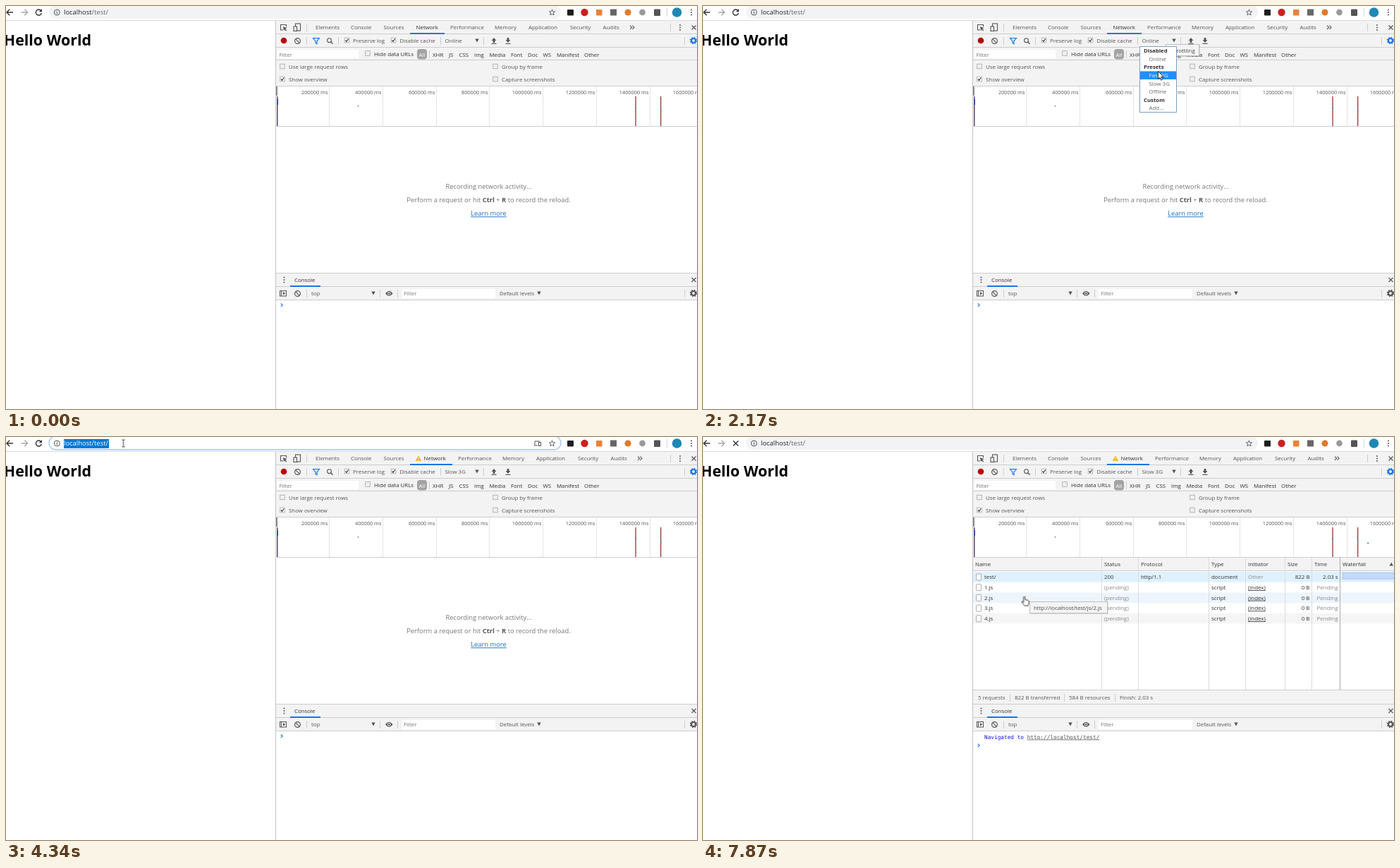
These frames come from a looping animation (980 by 571 pixels, 8000 ms). An HTML page:

```html
<!DOCTYPE html>
<html lang="en">
<head>
<meta charset="utf-8">
<title>Network throttling</title>
<style>
html, body { margin: 0; width: 100%; height: 100%; overflow: hidden; background: #fff; }
svg { display: block; font: 7.9px "Open Sans", "Noto Sans", sans-serif; }
text { white-space: pre; }
</style>
</head>
<body>
<svg id="stage" width="980" height="571" viewBox="0 0 980 571"></svg>
<script>
const LOOP = 8000;
const GREY = '#555', DARK = '#303030', LINE = '#cdcdcd', BAR = '#f3f3f3', BLUE = '#1a73e8';

// Drawing helpers; text is placed by the middle of its capitals
const text = (x, y, s, fill = GREY, attrs = '') =>
  `<text x="${x}" y="${y + 2.8}" fill="${fill}" ${attrs}>${s}</text>`;
const rect = (x, y, w, h, fill, attrs = '') =>
  `<rect x="${x}" y="${y}" width="${w}" height="${h}" fill="${fill}" ${attrs}/>`;
const circle = (x, y, r, fill, attrs = '') =>
  `<circle cx="${x}" cy="${y}" r="${r}" fill="${fill}" ${attrs}/>`;
const line = (d, stroke = GREY, w = 1, attrs = '') =>
  `<path d="${d}" fill="none" stroke="${stroke}" stroke-width="${w}" ${attrs}/>`;
const shape = (d, fill, attrs = '') => `<path d="${d}" fill="${fill}" ${attrs}/>`;
const hline = (y, x = 383, w = 597, c = LINE) => rect(x, y, w, 1, c);
const vline = (x, y, h, c = LINE) => rect(x, y, 1, h, c);
const labels = (y, fill, items) => items.map(([x, s]) => text(x, y, s, fill)).join('');
const END = 'text-anchor="end"', MID = 'text-anchor="middle"', BOLD = 'font-weight="700"';

// Groups shown only during the given [from, to] spans, kept in document order.
// A group that holds other timed groups passes a function, so that it is listed first.
const spans = [];
const during = (from, to, content, ...more) => {
  spans.push([[from, to], ...more]);
  return `<g class="timed">${typeof content === 'function' ? content() : content}</g>`;
};

// Icons
const dots = (x, y) => [-3.4, 0, 3.4].map(d => circle(x, y + d, 1, GREY)).join('');
const cross = (x, y, r = 3, c = GREY, w = 1.2) =>
  line(`M${x - r} ${y - r}l${2 * r} ${2 * r}m0 ${-2 * r}l${-2 * r} ${2 * r}`, c, w);
const gear = (x, y, c) => circle(x, y, 3, 'none', `stroke="${c}" stroke-width="2.2"`) +
  circle(x, y, 4.5, 'none', `stroke="${c}" stroke-width="1.5" stroke-dasharray="1.8 1.734"`);
const clear = (x, y) => circle(x, y, 3.9, 'none', `stroke="${GREY}" stroke-width="1.2"`) +
  line(`M${x - 2.7} ${y - 2.7}l5.4 5.4`, GREY, 1.2);
const down = (x, y) => shape(`M${x - 2.7} ${y - 2.4}h5.4l-2.7 4.8z`, GREY);
const check = (x, y, on) =>
  rect(x - 3.3, y - 3.3, 6.6, 6.6, on ? '#fff' : '#f0f0f0', 'stroke="#a5a5a5" stroke-width=".8"') +
  (on ? line(`M${x - 2} ${y}l1.5 1.8l2.7 -3.8`, '#333', 1.2) : '');
const load = (x, y, dir) => line(`M${x - 3.6} ${y + 4.4}h7.2`, GREY, 1.1) +
  shape(`M${x} ${y - 4 * dir - (dir < 0 ? 1 : 0)}l3.4 ${3.9 * dir}h-2v${3 * dir}h-2.8v${-3 * dir}h-2z`, GREY);
const arrowIcon = (x, dir, c) =>
  line(`M${x - 4.5 * dir} 9h${9 * dir}m${-4.2 * dir} -4.2l${4.2 * dir} 4.2l${-4.2 * dir} 4.2`, c, 1.4);
const page = (x, y) => rect(x, y, 7, 9, '#fff', 'stroke="#999" stroke-width=".8" rx=".8"');
const tooltip = (x, y, w, s) =>
  rect(x + 1, y + 1, w, 17, '#000', 'opacity=".12"') +
  rect(x + .5, y + .5, w - 1, 16, '#f4f4f4', 'stroke="#c0c0c0"') + text(x + 6, y + 8.8, s, '#4a4a4a');

function browserBar() {
  const url = (a, b) => text(82, 9.3, `${a}<tspan fill="${b}">/test/</tspan>`, '#222', 'font-size="9.45"');
  const star = Array.from({ length: 10 }, (_, i) => {
    const a = i * Math.PI / 5 - Math.PI / 2, r = i % 2 ? 1.9 : 4.4;
    return (774.5 + r * Math.cos(a)).toFixed(2) + ' ' + (9.3 + r * Math.sin(a)).toFixed(2);
  }).join('L');
  const pill = (fill, attrs = '') => rect(61, -1, 726, 19, fill, `rx="9.5" ${attrs}`);
  return rect(0, 0, 980, 20, '#fff') + hline(20, 0, 980, '#d9d9d9') +
    during(3370, 3520, circle(46, 9, 9.8, '#e8e8e8')) +
    arrowIcon(5.5, -1, '#333') + arrowIcon(26, 1, '#a8a8a8') +
    during(0, 5370, line('M49.2 6.2A4 4 0 1 0 50.3 9.8', '#333', 1.4) + shape('M51 4v4.3h-4.3z', '#333')) +
    during(5370, LOOP, cross(46.5, 9, 3.6, '#333', 1.4)) +
    pill('#f1f3f4') +
    during(4210, 5370, pill('#fff', 'stroke="#a3c2f3" stroke-width="1.3"') + rect(82, 3, 64, 13, '#0078d7') +
      line('M750 11.5v-5.5h7M749 12h5', GREY, 1) + rect(755.5, 7.5, 3, 5, 'none', `stroke="${GREY}"`)) +
    circle(72.3, 9, 4, 'none', `stroke="${GREY}"`) + rect(71.8, 8.3, 1.1, 3, GREY) + rect(71.8, 6.5, 1.1, 1.1, GREY) +
    during(0, 4210, url('localhost', '#666'), [5370, LOOP]) +
    during(4210, 5370, text(82, 9.3, 'localhost/test/', '#fff', 'font-size="9.45"')) +
    shape(`M${star}z`, 'none', `stroke="${GREY}" stroke-width=".9"`) +
    rect(796, 5, 9, 8.5, '#1d1d1d', 'rx="1"') + circle(820.5, 9, 5.2, '#c9211e') +
    rect(837, 5, 8.5, 8.5, '#e8833a') + rect(857, 4.5, 9, 9, '#666') +
    circle(882, 9, 4.6, '#e07a2d') + circle(902.5, 9, 4.4, '#9a9a9a') + rect(919, 4.5, 9, 9.5, '#555', 'rx="1"') +
    vline(937, 3, 12, '#d5d5d5') + circle(951.5, 9, 6.8, '#1f87b5') + dots(972, 9);
}

function tabBar() {
  const first = [[439, 'Elements'], [489, 'Console'], [535.5, 'Sources']];
  const rest = [[630, 'Performance'], [693, 'Memory'], [741, 'Application'], [800, 'Security'], [846.5, 'Audits']];
  const tabs = dx => labels(30.2, GREY, rest.map(([x, s]) => [x + dx, s])) +
    text(581.5 + dx, 30.2, 'Network', DARK) + rect(573, 38, dx ? 60 : 49, 2, BLUE) +
    line(`M${885 + dx} 27.6l2.6 2.6l-2.6 2.6m3.4 -5.2l2.6 2.6l-2.6 2.6`, GREY, 1.1);
  return rect(383, 21, 597, 149, BAR) + vline(382, 21, 550, '#c4c4c4') + hline(39) +
    line('M393 34h-3.5v-7.5h8v3', GREY, 1.1) + shape('M393 29l5.5 2.2l-2.3 1l2 2.2l-1 1l-2.1 -2.2l-1 2z', GREY) +
    rect(410.5, 25, 7, 10, 'none', `stroke="${GREY}" stroke-width="1.1"`) +
    rect(408, 29, 4.5, 6.5, BAR, `stroke="${GREY}" stroke-width="1.1"`) + vline(426, 25, 11) +
    labels(30.2, GREY, first) +
    during(0, 3040, tabs(0)) +
    during(3040, LOOP, tabs(11) + shape('M585 26.2l4.2 7.6h-8.4z', '#f2b01e') +
      rect(584.6, 28.6, .9, 2.6, '#fff') + rect(584.6, 32, .9, .9, '#fff')) +
    vline(942, 25, 11) + dots(956, 30.5) + cross(975.5, 30.5);
}

function networkTools() {
  const types = [[605, 'XHR'], [628, 'JS'], [642.5, 'CSS'], [664, 'Img'], [685.5, 'Media'], [716, 'Font'],
    [740, 'Doc'], [761.5, 'WS'], [781, 'Manifest'], [820, 'Other']];
  return circle(394, 49, 4.3, '#b80000') + clear(413.5, 49.5) + vline(426, 44, 11) +
    shape('M435.5 45.5h9l-3.4 4.2v4l-2.2 -1.2v-2.8z', '#d5e6fb', `stroke="${BLUE}" stroke-width="1.1"`) +
    circle(458.5, 48.7, 2.9, 'none', `stroke="${GREY}" stroke-width="1.1"`) + line('M460.6 50.8l3 3', GREY, 1.3) +
    vline(471, 44, 11) + check(483.5, 48.5, 1) + text(492, 49.3, 'Preserve log') +
    check(549.5, 48.5, 1) + text(558.3, 49.3, 'Disable cache') + vline(616, 44, 11) +
    during(0, 3040, text(622.5, 49.3, 'Online')) + during(3040, LOOP, text(622.5, 49.3, 'Slow 3G')) +
    down(668, 49) + vline(677, 44, 11) + load(692, 49, 1) + load(712, 49, -1) +
    vline(962, 44, 11) + gear(975, 49, BLUE) + hline(58) +
    rect(385, 62, 115, 12, '#fff') + text(387.5, 68.8, 'Filter', '#777') +
    check(513, 67, 0) + text(522, 68.4, 'Hide data URLs', DARK) +
    rect(583, 61, 14, 14.5, '#a3a3a3', 'rx="4"') + text(590, 68.7, 'All', '#fff', MID) +
    vline(600, 63, 11) + labels(68.7, DARK, types) + hline(76) +
    [[392, 86, 0, 'Use large request rows'], [392, 104, 1, 'Show overview'],
     [694, 86, 0, 'Group by frame'], [694, 104, 0, 'Capture screenshots']]
      .map(([x, y, on, s]) => check(x, y - .5, on) + text(x + 9, y + .5, s)).join('');
}

function overview() {
  let s = rect(383, 114, 597, 56, '#fff') + hline(113);
  for (let i = 1; i <= 8; i++) {
    const x = Math.floor(382.6 + 75.8 * i);
    s += vline(x, 114, 56, '#e4e4e4') + text(x - 1.6, 122.6, i * 200000 + ' ms', GREY, END + ' font-size="7.35"');
  }
  const mark = x => rect(x, 128, 1.3, 42, '#8d3a3a');
  return s + rect(383, 114, 2, 13, '#8a8a8a') + rect(384, 128, 1, 42, '#4a4a86') + rect(385, 128, .7, 42, '#a0705c') +
    rect(384, 132, 2, 8, '#2b4fa0') +
    rect(498.5, 141, 2, 1.4, '#888') + mark(892.4) + mark(928) +
    rect(892.6, 143, 1.2, 3, '#3a8a90') + rect(928.2, 148, 1.2, 3, '#3a8a90') +
    during(7360, LOOP, rect(942, 149.6, 2.4, 1.5, '#2fa56a')) + hline(170);
}

function emptyState() {
  const big = (y, s, c, a = '') => text(684.5, y + .5, s, c, `${MID} font-size="9.35" ${a}`);
  const key = s => `<tspan ${BOLD} fill="#555">${s}</tspan>`;
  return big(255.5, 'Recording network activity…', '#777') +
    big(274.5, `Perform a request or hit ${key('Ctrl')} + ${key('R')} to record the reload.`, '#777') +
    big(294, 'Learn more', '#1c6fc4', 'text-decoration="underline"');
}

function requestTable() {
  const rowY = i => 198.5 + 14.7 * i;
  const stripe = (i, c) => rect(383, rowY(i) - 7.5, 597, 14.7, c);
  const row = (i, name, status, proto, type, init, size, time) => {
    const y = rowY(i), wait = status === '(pending)';
    return page(387.5, y - 4.5) + text(399, y, name, DARK) + text(569, y, status, wait ? '#888' : DARK) +
      text(621, y, proto, DARK) + text(721, y, type, DARK) +
      (init === 'Other' ? text(773, y, init, '#888') : text(773, y, init, DARK, 'text-decoration="underline"')) +
      text(860.5, y, size, DARK, END) + text(900.5, y, time, wait ? '#888' : DARK, END);
  };
  const scripts = [1, 2, 3, 4].map(i => row(i, i + '.js', '(pending)', '', 'script', '(index)', '0 B', 'Pending')).join('');
  const footer = (...items) => items.map(([x, s], i) =>
    text(x, 369.2, s) + (i ? vline(x - 7, 364, 11) : '')).join('');
  const columns = [565, 617, 717, 769, 825, 863].map(x => vline(x, 171, 188, '#dcdcdc')).join('');
  return rect(383, 171, 597, 187, '#fff') + rect(383, 171, 597, 18, BAR) + hline(189) +
    during(5370, 7400, stripe(0, '#f5f5f5')) +
    during(7360, LOOP, stripe(4, '#f5f5f5')) + during(7360, 7400, stripe(2, '#f5f5f5')) +
    during(7400, LOOP, stripe(0, '#dff1ff') + stripe(2, '#edf4fc')) +
    columns + vline(903, 171, 188, '#aaa') +
    labels(180.3, DARK, [[386, 'Name'], [569, 'Status'], [621, 'Protocol'], [721, 'Type'], [773, 'Initiator'],
      [829, 'Size'], [867, 'Time'], [907, 'Waterfall']]) + shape('M973.5 182.6h5.4l-2.7 -4.8z', GREY) +
    rect(907.3, 192.2, 76, 9, '#c3dafb', 'stroke="#9dbef0" stroke-width=".8"') +
    rect(383, 359, 597, 19, BAR) + hline(358) +
    during(5370, 7360, row(0, 'test/', '(pending)', '', 'document', 'Other', '0 B', 'Pending') +
      footer([390, '1 requests'], [442, '0 B transferred'], [510, '0 B resources'])) +
    during(7360, LOOP, row(0, 'test/', '200', 'http/1.1', 'document', 'Other', '822 B', '2.03 s') + scripts +
      footer([390, '5 requests'], [442, '822 B transferred'], [519, '584 B resources'], [591, 'Finish: 2.03 s']));
}

function drawer() {
  const prompt = y => line(`M389.8 ${y - 2.3}l2.4 2.3l-2.4 2.3`, '#2f7de1', 1.2);
  return rect(383, 378, 597, 38, BAR) + hline(378) + dots(394.5, 388) + text(409, 388, 'Console', DARK) +
    hline(397) + rect(403, 396, 43, 2, BLUE) + cross(975.5, 388) +
    rect(388.5, 403.5, 9, 7.5, 'none', `stroke="${GREY}"`) + vline(390, 404, 7, GREY) + shape('M393 405l3.3 2.3l-3.3 2.3z', GREY) +
    clear(413.5, 407.5) + vline(426, 402, 11) + text(433, 407.3, 'top') + down(521, 407) + vline(530, 402, 11) +
    shape('M538 407.3q5.3 -7 10.6 0q-5.3 7 -10.6 0z', GREY) + circle(543.3, 407.3, 2.3, BAR) + circle(543.3, 407.3, 1.3, GREY) +
    vline(555, 402, 11) + rect(561, 401, 133, 13, '#fff') + text(564, 407.5, 'Filter', '#777') +
    text(700, 407.3, 'Default levels') + down(756, 407) + vline(962, 402, 11) + gear(975, 407, GREY) + hline(416) +
    during(0, 7360, prompt(423.8)) +
    during(7360, LOOP, text(399, 424.8, 'Navigated to <tspan fill="#555" text-decoration="underline">http://localhost/test/</tspan>',
      '#1010e8', 'font-size="7.75" font-family="DejaVu Sans Mono, monospace"') + prompt(437));
}

function throttleMenu() {
  const items = ['*Disabled', 'Online', '*Presets', 'Fast 3G', 'Slow 3G', 'Offline', '*Custom', 'Add…'];
  const y = i => 63.5 + 11.55 * i;
  const entry = (i, c) => items[i][0] === '*'
    ? text(625, y(i), items[i].slice(1), DARK, BOLD + ' font-size="7.8"') : text(632.5, y(i), items[i], c);
  const pick = (i, from, to) => during(from, to, rect(620, y(i) - 5.7, 51, 11.5, '#1e90ff') + entry(i, '#e4f1ff'));
  return during(1560, 3040, rect(619.5, 57.5, 52, 93, '#fff', 'stroke="#7f9fc6"') + items.map((_, i) => entry(i, '#666')).join('')) +
    pick(1, 1560, 2170) + pick(3, 2170, 2400) + pick(4, 2400, 3040);
}

function pointer() {
  const ink = 'stroke="#222" stroke-width=".9" stroke-linejoin="round"';
  return during(1560, 1660, circle(0, 1.5, 8, '#d6dc28', 'opacity=".65"'), [2960, 3040], [4210, 4340]) +
    during(180, 3490, shape('M.4 .4v11l2.5 -2.3l1.8 4l1.8 -.8l-1.8 -3.9h3.4z', '#fff', ink), [5730, 7770]) +
    during(3490, 5730, line('M-2 -5h1.6l.4 .5l.4 -.5h1.6M0 -4.5v9M-2 5h1.6l.4 -.5l.4 .5h1.6', '#222', .9)) +
    during(7770, LOOP, shape('M-1.8 9V1.6a1.1 1.1 0 0 1 2.2 0V5l4.4 1q1.2 .4 1.1 2l-.6 3.4l-.8 2.2h-5l-3.6 -4.8q-.8 -1.4 .6 -1.5z', '#fff', ink));
}

const stage = document.getElementById('stage');
stage.innerHTML = rect(0, 0, 980, 571, '#fff') +
  `<text x="-3.2" y="56.2" font-size="21.4" ${BOLD}>Hello World</text>` +
  browserBar() + tabBar() + networkTools() + overview() +
  during(0, 5370, emptyState) + during(5370, LOOP, requestTable) + drawer() +
  during(1020, 1130, tooltip(648, 72, 144, 'Ctrl + Click to select multiple types')) +
  during(1130, 1560, tooltip(651, 64, 49, 'Throttling')) +
  during(2170, 3040, tooltip(656, 54, 48, 'Throttling')) +
  throttleMenu() +
  during(7820, LOOP, tooltip(463, 233, 111, 'http://localhost/test/js/2.js')) +
  `<g id="pointer">${pointer()}</g>`;

const timing = { duration: LOOP, iterations: Infinity };
const running = [];

stage.querySelectorAll('.timed').forEach((el, i) => {
  const step = (ms, opacity) => ({ offset: ms / LOOP, opacity, easing: 'steps(1)' });
  const shown = spans[i];
  const keys = shown[0][0] > 0 ? [step(0, 0)] : [];
  for (const [from, to] of shown) {
    keys.push(step(from, 1));
    keys.push(step(to, to < LOOP ? 0 : 1));
  }
  if (shown.at(-1)[1] < LOOP) keys.push(step(LOOP, 0));
  running.push(el.animate(keys, timing));
});

// Pointer path: time, x, y
const path = [
  [0, 918, 571], [180, 918, 571], [300, 860, 450], [500, 740, 200], [700, 655, 80], [850, 642, 63],
  [1020, 642, 64], [1200, 644, 56], [1330, 648, 46], [1840, 648, 46], [2020, 645, 88], [2170, 645, 92],
  [2400, 646, 106], [2760, 646, 107], [3040, 646, 107], [3150, 500, 70], [3300, 180, 24], [3400, 50, 8],
  [3480, 52, 8], [3550, 86, 6], [3700, 86, 6], [4010, 166.5, 9], [5700, 166.5, 9], [5790, 250, 55],
  [5880, 352.5, 129.5], [6050, 470, 225], [6150, 481, 255], [6240, 468, 260], [6340, 457, 242],
  [6520, 457, 242], [6750, 456.5, 225.5], [LOOP, 456.5, 225.5]
];
running.push(document.getElementById('pointer').animate(
  path.map(([ms, x, y]) => ({ offset: ms / LOOP, transform: `translate(${x}px, ${y}px)` })), timing));

// One shared start keeps every part in step
const start = document.timeline.currentTime ?? 0;
running.forEach(a => { a.startTime = start; });
</script>
</body>
</html>
```
